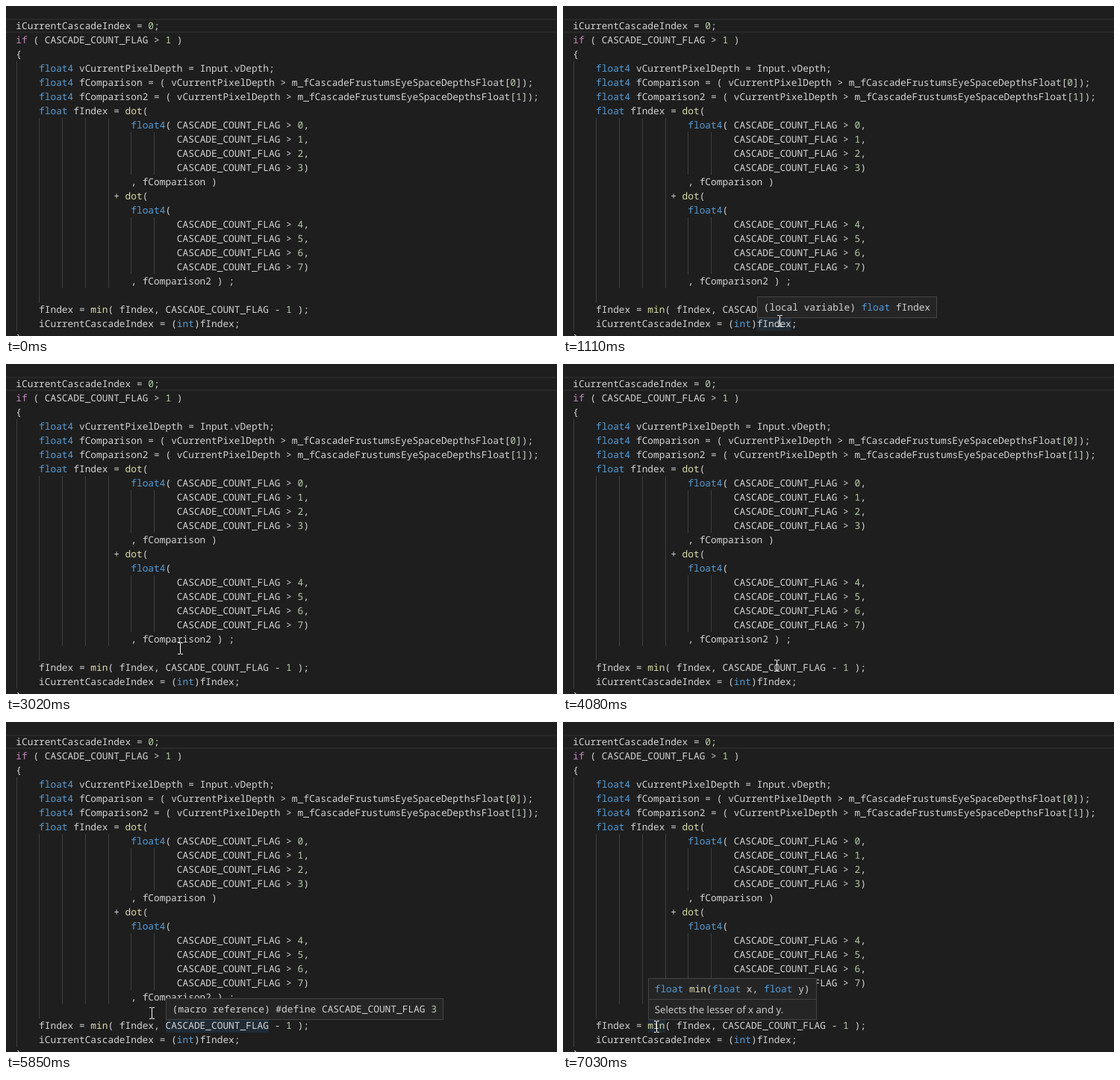
Recreate the animation shown at these times as an HTML page. Size 738 by 442 pixels, loop 8 s.

```html
<!DOCTYPE html>
<html lang="en">
<head>
<meta charset="utf-8">
<title>Shader code hover</title>
<style>
html, body { margin: 0; width: 100%; height: 100%; overflow: hidden; background: #1e1e1e; }
svg { position: absolute; left: 0; top: 0; display: block; }
text { font: 12.83px "Noto Sans Mono", "DejaVu Sans Mono", monospace; fill: #d4d4d4; text-rendering: geometricPrecision; }
.prose { font: 13.24px "Open Sans", "Noto Sans", sans-serif; }
.type { fill: #569cd6; }
.flow { fill: #c586c0; }
.call { fill: #dcdcaa; }
.num { fill: #b5cea8; }
.guide { fill: #404040; }
.line { fill: none; stroke: #282828; stroke-width: 2; }
.word { fill: #264f78; fill-opacity: .25; }
.tip rect { fill: #252526; stroke: #454545; }
.tip path { stroke: #454545; }

.local, .macro, .func, #cursor { animation: 8s step-end infinite; }
.local { animation-name: local; }
.macro { animation-name: macro; }
.func { animation-name: func; }

@keyframes local {
  0%, 34.1% { opacity: 0; }
  12.925% { opacity: .5; }
  13.875% { opacity: 1; }
  100% { opacity: 0; }
}
@keyframes macro {
  0%, 75.25% { opacity: 0; }
  51.875% { opacity: .5; }
  52.875% { opacity: 1; }
  100% { opacity: 0; }
}
@keyframes func {
  0% { opacity: 0; }
  86.75% { opacity: .5; }
  87.875%, 100% { opacity: 1; }
}

/* I-beam pointer, 7 x 16 */
#cursor {
  --bar: linear-gradient(90deg, #fff 3px, #0000 3px 4px, #fff 4px);
  position: absolute; width: 7px; height: 16px;
  background: var(--bar) 0 0 / 7px 1px no-repeat,
              var(--bar) 0 15px / 7px 1px no-repeat,
              linear-gradient(#fff, #fff) 3px 1px / 1px 14px no-repeat;
  animation-name: point;
}
@keyframes point {
  0% { left: 299px; top: 443px; }
  6.25% { left: 299px; top: 443px; animation-timing-function: steps(7, start); }
  12.925% { left: 287px; top: 414px; }
  31.25% { left: 287px; top: 414px; animation-timing-function: steps(6, start); }
  36.95% { left: 237px; top: 379px; }
  37.75% { left: 237px; top: 379px; animation-timing-function: steps(1, start); }
  38.125% { left: 230px; top: 373px; animation-timing-function: steps(2, start); }
  39.875% { left: 227px; top: 372px; animation-timing-function: steps(8, start); }
  47.95% { left: 283px; top: 403px; }
  48.875% { left: 283px; top: 403px; animation-timing-function: steps(3, start); }
  51.75% { left: 283px; top: 396px; }
  57.625% { left: 283px; top: 397px; }
  59.75% { left: 283px; top: 397px; animation-timing-function: steps(3, start); }
  62.6% { left: 280px; top: 398px; }
  65.5% { left: 280px; top: 399px; }
  67.375% { left: 280px; top: 399px; animation-timing-function: steps(7, start); }
  74.075% { left: 192px; top: 382px; }
  74.25% { left: 192px; top: 382px; animation-timing-function: steps(4, start); }
  78.125% { left: 148px; top: 378px; animation-timing-function: steps(7, start); }
  84.875% { left: 122px; top: 398px; }
  85.625%, 100% { left: 122px; top: 400px; }
}
</style>
</head>
<body>
<svg width="738" height="442" viewBox="0 0 738 442">
  <rect class="line" x="-2" y="18" width="742" height="17"/>
  <g id="guides"></g>
  <rect class="word local" x="260" y="416" width="46" height="19"/>
  <rect class="word macro" x="214" y="397" width="138" height="19"/>
  <rect class="word func" x="114" y="397" width="23" height="19"/>
  <g id="code"></g>
  <g class="tip local" id="localTip"><rect x="260.5" y="389.5" width="240" height="28"/></g>
  <g class="tip macro" id="macroTip"><rect x="214.5" y="370.5" width="371" height="28"/></g>
  <g class="tip func" id="funcTip">
    <rect x="114.5" y="343.5" width="225" height="55"/>
    <path d="M115 371.5h224"/>
    <text class="prose" x="122.7" y="390">Selects the lesser of x and y.</text>
  </g>
</svg>
<div id="cursor"></div>
<script>
const CHAR = 7.698, LINE = 19;
const source = `iCurrentCascadeIndex = 0;
if ( CASCADE_COUNT_FLAG > 1 )
{
    float4 vCurrentPixelDepth = Input.vDepth;
    float4 fComparison = ( vCurrentPixelDepth > m_fCascadeFrustumsEyeSpaceDepthsFloat[0]);
    float4 fComparison2 = ( vCurrentPixelDepth > m_fCascadeFrustumsEyeSpaceDepthsFloat[1]);
    float fIndex = dot(
                    float4( CASCADE_COUNT_FLAG > 0,
                            CASCADE_COUNT_FLAG > 1,
                            CASCADE_COUNT_FLAG > 2,
                            CASCADE_COUNT_FLAG > 3)
                    , fComparison )
                 + dot(
                    float4(
                            CASCADE_COUNT_FLAG > 4,
                            CASCADE_COUNT_FLAG > 5,
                            CASCADE_COUNT_FLAG > 6,
                            CASCADE_COUNT_FLAG > 7)
                    , fComparison2 ) ;

    fIndex = min( fIndex, CASCADE_COUNT_FLAG - 1 );
    iCurrentCascadeIndex = (int)fIndex;
}`;

const byId = id => document.getElementById(id);

function add(parent, tag, attrs) {
  const el = document.createElementNS('http://www.w3.org/2000/svg', tag);
  for (const key in attrs) el.setAttribute(key, attrs[key]);
  return parent.appendChild(el);
}

function kind(token) {
  if (/^\d/.test(token)) return 'num';
  if (/^(float4?|int)$/.test(token)) return 'type';
  if (/^(dot|min)$/.test(token)) return 'call';
  return token === 'if' ? 'flow' : '';
}

// Every token sits on its own column of the character grid.
function print(parent, str, x, y) {
  for (const m of str.matchAll(/[A-Za-z_]\w*|\d+|[^\s\w]+/g)) {
    add(parent, 'text', { x: x + m.index * CHAR, y, class: kind(m[0]) }).textContent = m[0];
  }
}

source.split('\n').forEach((str, row) => {
  const indent = str ? str.search(/\S/) : 8;
  for (let col = 0; col < indent; col += 4) {
    add(byId('guides'), 'rect', {
      class: 'guide', x: Math.floor(14 + col * CHAR), y: 17 + row * LINE, width: 1, height: LINE
    });
  }
  print(byId('code'), str, 13.3, 31 + row * LINE);
});

print(byId('localTip'), '(local variable) float fIndex', 268.8, 408);
print(byId('macroTip'), '(macro reference) #define CASCADE_COUNT_FLAG 3', 222.8, 389);
print(byId('funcTip'), 'float min(float x, float y)', 122.7, 362);
</script>
</body>
</html>
```
